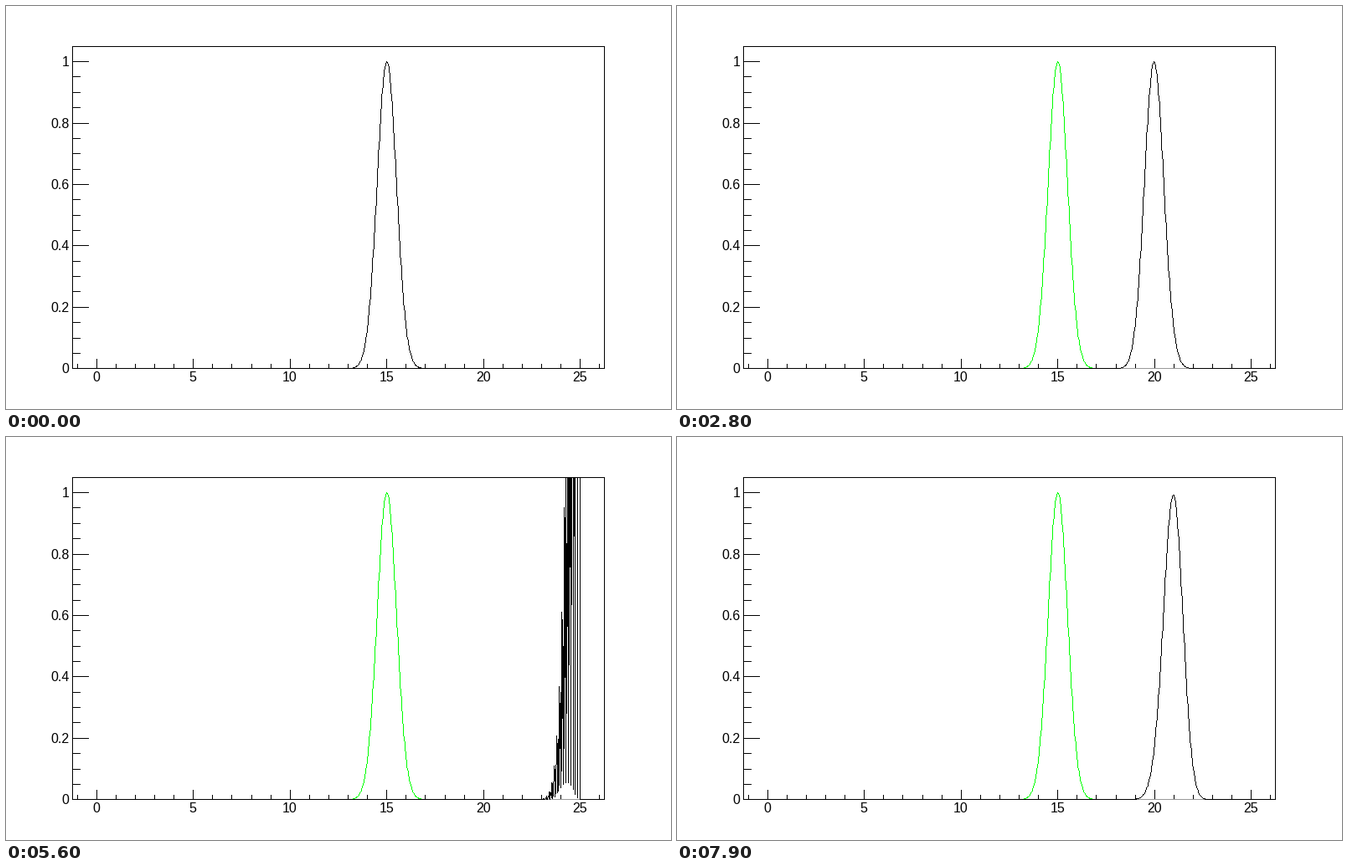
A matplotlib script for the animation above (8000 ms loop, 794 by 482 pixels).

```python
import numpy as np
import matplotlib.pyplot as plt
from matplotlib.animation import FuncAnimation

W, H, DPI = 794, 482, 100
FRAMES, STEP_MS = 80, 100
LEFT, RIGHT, TOP, BOTTOM = 0.1 * W, 0.9 * W, 0.1 * H, 0.9 * H

BLACK, GREEN, GREY = (0, 0, 0), (0, 255, 0), (153, 153, 153)

START, SPEED, WALL = 15.0, 0.1784, 25.0
SIGMA, SPREAD, SKEW, WAVE = 0.5, 451.0, 0.00038, 50.0
xs = np.linspace(0, WALL, 1001)


def px(x):
    return LEFT + (np.asarray(x) + 1.25) * (RIGHT - LEFT) / 27.5


def py(y):
    return BOTTOM - np.asarray(y) * (BOTTOM - TOP) / 1.05


def stroke(img, x, y, color):
    """One-pixel polyline without smoothing, cut off at the plot frame."""
    x, y = np.floor(x).astype(int), np.floor(y).astype(int)
    dx, dy = np.diff(x), np.diff(y)
    n = np.maximum(np.maximum(abs(dx), abs(dy)), 1)
    seg = np.repeat(np.arange(len(n)), n)
    part = (np.arange(len(seg)) - (np.cumsum(n) - n)[seg] + 1) / n[seg]
    cols = np.append(x[0], np.rint(x[seg] + part * dx[seg]).astype(int))
    rows = np.append(y[0], np.rint(y[seg] + part * dy[seg]).astype(int))
    ok = (rows > TOP) | (rows == int(TOP))
    img[rows[ok], cols[ok]] = color


def packet(u, n):
    """Amplitude of the travelling packet, u ahead of its mean position."""
    grow = 1 + (n / SPREAD) ** 2
    z = u / (SIGMA * np.sqrt(2 * grow))
    return grow ** -0.25 * np.exp(-z ** 2 / 2) * (1 + SKEW * n * (z ** 3 - 3 * z))


def density(n):
    """Incoming packet interfering with its reflection at the wall."""
    mean = START + SPEED * n
    a = packet(xs - mean, n)
    b = packet(2 * WALL - xs - mean, n)
    return a ** 2 + b ** 2 - 2 * a * b * np.cos(2 * WAVE * (WALL - xs))


def make_base():
    img = np.full((H, W, 3), 255, np.uint8)
    stroke(img, np.array([LEFT, RIGHT, RIGHT, LEFT, LEFT]),
           np.array([TOP, TOP, BOTTOM, BOTTOM, TOP]), BLACK)
    for v in range(-1, 27):
        size = 11.6 if v % 5 == 0 else 5.8
        stroke(img, np.array([px(v)] * 2), np.array([BOTTOM, BOTTOM - size]), BLACK)
    for i in range(21):
        size = 19.1 if i % 4 == 0 else 9.5
        stroke(img, np.array([LEFT, LEFT + size]), np.array([py(i / 20)] * 2), BLACK)
    return img


def label(x, y, s, ha):
    fig.text(x / W, 1 - y / H, s, ha=ha, va="baseline", color="black",
             fontname="Liberation Sans", fontsize=16 * 72 / DPI)


fig = plt.figure(figsize=(W / DPI, H / DPI), dpi=DPI, facecolor="white")
ax = fig.add_axes([0, 0, 1, 1])
ax.axis("off")

for v in range(0, 26, 5):
    label(px(v) - 0.5, 449, str(v), "center")
for i in range(6):
    label(75.5, np.floor(py(i / 5)) + 6, f"{i / 5:g}", "right")

base = make_base()
trail = base.copy()
stroke(trail, px(xs), py(density(0)), GREEN)
stroke(trail, px([0, WALL]), py([0, 0]), GREY)
view = ax.imshow(base, interpolation="nearest", aspect="auto")


def draw(n):
    img = (trail if n else base).copy()
    stroke(img, px(xs), py(density(n)), BLACK)
    view.set_data(img)
    return [view]


anim = FuncAnimation(fig, draw, frames=FRAMES, interval=STEP_MS,
                     repeat=True, repeat_delay=0, blit=False)
plt.show()
```
